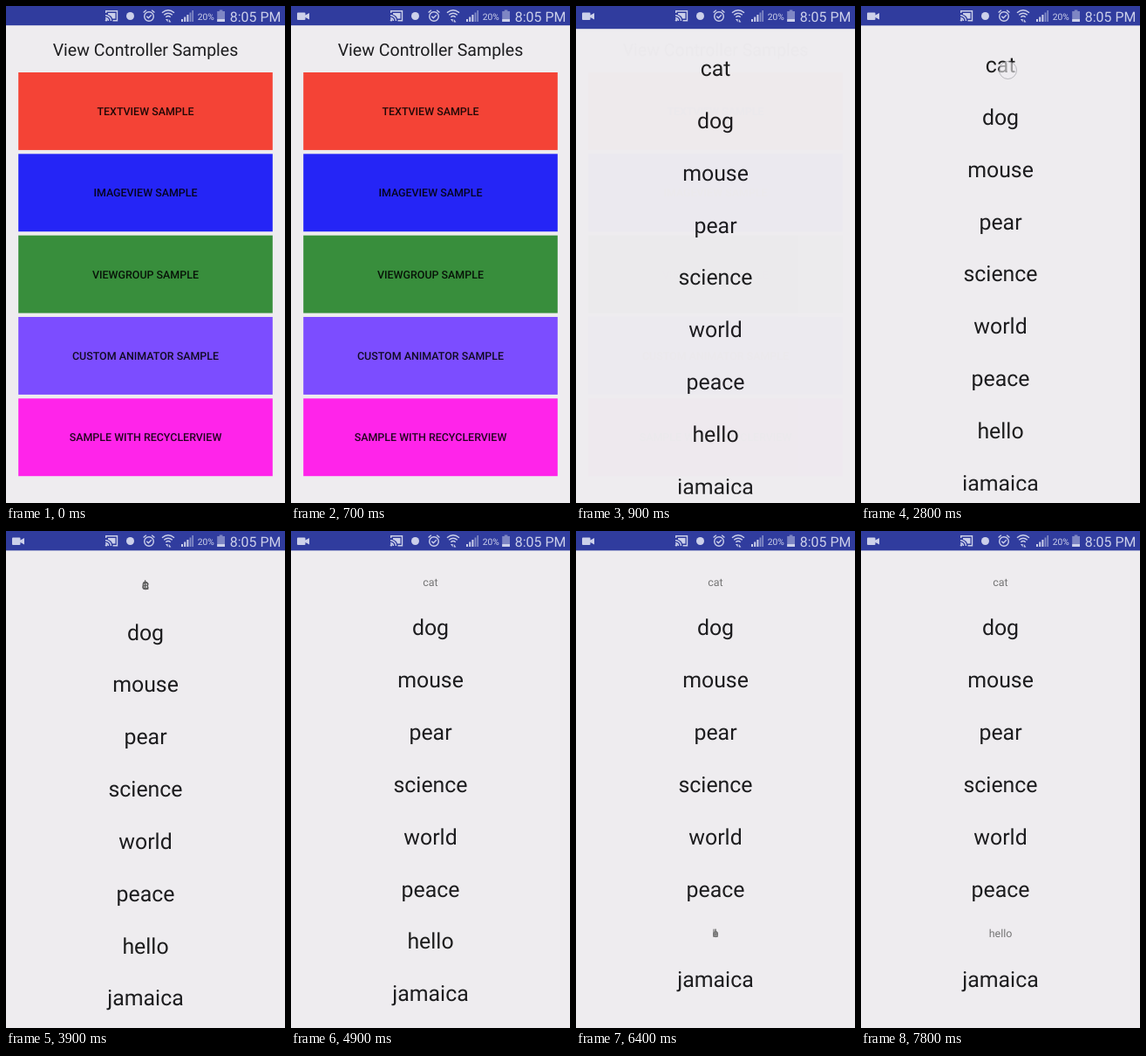
An HTML page that plays this animation: 320 by 569 pixels, repeating every 8 s.

```html
<!DOCTYPE html>
<html lang="en">
<head>
<meta charset="utf-8">
<title>View Controller Samples</title>
<style>
  html, body { margin: 0; width: 100%; height: 100%; overflow: hidden; background: #eeecef; }
  svg { display: block; width: 100vw; height: 100vh; }
  text { font-family: Roboto, "Noto Sans", sans-serif; text-rendering: geometricPrecision; }
  .mid { text-anchor: middle; }
  .icons { fill: #ccd0ea; stroke: none; }
  .line { fill: none; stroke: #ccd0ea; stroke-width: 1.4; }
</style>
</head>
<body>
<svg id="stage" viewBox="0 0 320 569">
  <defs>
    <clipPath id="listClip"><rect y="36" width="320" height="518.8"/></clipPath>
  </defs>

  <g id="menu">
    <rect width="320" height="569" fill="#eeecef"/>
    <text class="mid" x="160" y="57.3" font-size="19.56" fill="#1d1d1f">View Controller Samples</text>
  </g>

  <g id="list">
    <rect width="320" height="569" fill="#eeecef"/>
    <rect width="320" height="22.2" fill="#303c9e"/>
    <g id="rows" clip-path="url(#listClip)"></g>
  </g>

  <circle id="touch" r="10" fill="#f0eff2" fill-opacity=".6" stroke="#8c8c94" stroke-opacity=".55"/>

  <rect width="320" height="22.2" fill="#303c9e"/>
  <g class="icons">
    <path id="camera" d="M8 7.5h7.5q1 0 1 1v2l4.5-2.6v7.6l-4.5-2.6v2q0 1-1 1H8q-1 0-1-1V8.500q0-1 1-1z"/>
    <!-- screen cast -->
    <path class="line" d="M114.700 8V5.700h12.800v11h-5"/>
    <path d="M117 8h8.500v6.500h-3.500q-1-3.800-5-4.700z"/>
    <path class="line" d="M114 10.800a6.500 6.500 0 0 1 6.500 6.200M114 13.700a3.500 3.500 0 0 1 3.500 3.300"/>
    <circle cx="115" cy="16.300" r="1.200"/>
    <circle cx="142.500" cy="11.500" r="4.500"/>
    <!-- alarm -->
    <circle class="line" cx="164" cy="12" r="5.300"/>
    <path class="line" d="M157.600 7.500l3.200-2.700M170.400 7.500l-3.200-2.700M161.300 11.800l2 2 3.500-3.600"/>
    <!-- wifi -->
    <path class="line" d="M179 7.800q7-6 14 0M181.200 10.300q4.800-4.200 9.600 0M183.300 12.700q2.700-2.400 5.400 0"/>
    <path d="M183 15h2.600v3.500zM186.800 18.500h2.600l-2.600-3.500z"/>
    <!-- signal -->
    <path d="M201 15h2v3h-2zM204.200 12.500h2v5.500h-2zM207.400 10h2v8h-2z"/>
    <path d="M210.600 7.500h1.800V18h-1.800zM213.400 5h1.600v13h-1.600z" opacity=".55"/>
    <text x="219.800" y="16" font-size="10.3">20%</text>
    <!-- battery -->
    <path d="M244.800 4.500h3.600V6h2.600v12h-8.800V6h2.600z" opacity=".5"/>
    <path d="M242.200 15h8.800v3h-8.800z"/>
    <text x="256.800" y="17.800" font-size="15.9">8:05 PM</text>
  </g>
</svg>
<script>
const LOOP = 8000, STEP = 100, BIG = 24.89, SMALL = 12.44;
const SVG_NS = "http://www.w3.org/2000/svg";
const $ = id => document.getElementById(id);

const buttons = [
  ["TEXTVIEW SAMPLE", "#f44336"],
  ["IMAGEVIEW SAMPLE", "#2525f6"],
  ["VIEWGROUP SAMPLE", "#388e3c"],
  ["CUSTOM ANIMATOR SAMPLE", "#7c4dff"],
  ["SAMPLE WITH RECYCLERVIEW", "#ff24ea"]
];
const words = ["cat", "dog", "mouse", "pear", "science", "world", "peace", "hello", "jamaica"];
const tapAt = { cat: 2800, hello: 5100 };
const touches = [
  { at: 400, end: 600, x: 168, y: 500 },
  { at: tapAt.cat, end: 3000, x: 168.5, y: 73.5 },
  { at: tapAt.hello, end: 5300, x: 168.5, y: 470 }
];

function add(parent, tag, attrs, label) {
  const el = document.createElementNS(SVG_NS, tag);
  for (const key in attrs) el.setAttribute(key, attrs[key]);
  if (label) el.textContent = label;
  return parent.appendChild(el);
}

buttons.forEach(([label, fill], i) => {
  const y = 76 + i * 93.33;
  add($("menu"), "rect", { x: 14.2, y, width: 291.6, height: 88.9, fill });
  add($("menu"), "text", {
    class: "mid", x: 160, y: y + 49, "font-size": 12.44, "font-weight": 500, fill: "#000", "fill-opacity": .87
  }, label);
});

const rows = words.map(word => {
  const el = add($("rows"), "text", { class: "mid", x: 160, "font-size": BIG, fill: "#1d1d1f" }, word);
  // letter centres relative to the word's centre, in em
  const centres = [...word].map((_, i) =>
    ((el.getStartPositionOfChar(i).x + el.getEndPositionOfChar(i).x) / 2 - 160) / BIG);
  return { el, centres, tap: tapAt[word] };
});

const clamp = v => Math.min(1, Math.max(0, v));
const part = (t, from, to) => clamp((t - from) / (to - from));
const smooth = p => (1 - Math.cos(Math.PI * p)) / 2;
const mix = (a, b, p) => a + (b - a) * p;

function drawRows(t) {
  let top = 36.44;
  for (const { el, centres, tap } of rows) {
    let size = BIG;
    if (tap) {
      const since = t - tap;
      const shrink = smooth(part(since, 850, 1250));
      const spread = 1 - smooth(part(since, 50, 850)) + smooth(part(since, 1250, 2100));
      size = mix(BIG, SMALL, shrink);
      const grey = Math.round(mix(29, 117, shrink));
      el.setAttribute("font-size", size);
      el.setAttribute("fill", `rgb(${grey},${grey},${grey})`);
      el.setAttribute("x", centres.map(c => 160 + c * size * spread).join(" "));
    }
    el.setAttribute("y", top + 13.4 + 1.056 * size);
    top += 26.8 + 1.327 * size;
  }
}

function draw(t) {
  $("camera").style.display = t < 100 ? "none" : "";

  // the list slides up while fading in
  const slide = 45.5 * (1 - part(t, 765, 1115)) ** 5;
  $("list").setAttribute("transform", `translate(0 ${slide})`);
  $("list").setAttribute("opacity", 1 - (1 - part(t, 765, 965)) ** 4);
  drawRows(t);

  const touch = touches.find(p => t >= p.at && t < p.end);
  $("touch").style.display = touch ? "" : "none";
  if (touch) {
    $("touch").setAttribute("cx", touch.x);
    $("touch").setAttribute("cy", touch.y);
  }
}

const start = performance.now();
function tick() {
  const t = (performance.now() - start) % LOOP;
  draw(Math.floor(t / STEP) * STEP);
  requestAnimationFrame(tick);
}
tick();
</script>
</body>
</html>
```
